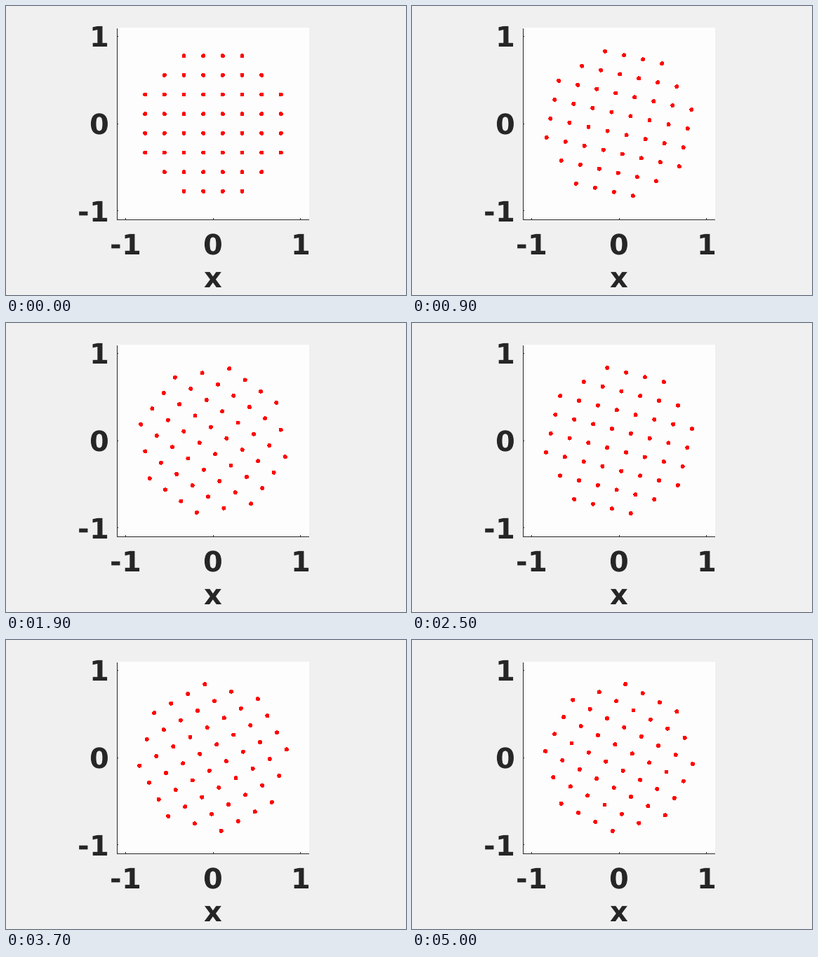
A matplotlib script that plays this animation: 570x413 px, repeating every 5.1 s.

```python
import numpy as np
import matplotlib.pyplot as plt
from matplotlib.animation import FuncAnimation
from matplotlib.patches import PathPatch, Rectangle
from matplotlib.path import Path
from matplotlib.textpath import TextPath

W, H, DPI = 570, 413, 64
FRAMES, INTERVAL = 51, 100
CX, CY, UNIT = 295.0, 168.0, 124.5   # plot centre and pixels per data unit
TURN = np.radians(-11.364)           # clockwise rotation per frame
DOT = 5.0                            # dot diameter in pixels
INK = "#262626"
FONT = {"family": "DejaVu Sans", "weight": "bold"}

fig = plt.figure(figsize=(W / DPI, H / DPI), dpi=DPI, facecolor="#f0f0f0")
ax = fig.add_axes([0, 0, 1, 1])
ax.set_xlim(0, W)
ax.set_ylim(H, 0)
ax.axis("off")


def box(x, y, w, h, color):
    ax.add_patch(Rectangle((x, y), w, h, facecolor=color, linewidth=0,
                           antialiased=False))


def glyph(x, baseline, char):
    """Draw one unhinted character with its origin at (x, baseline)."""
    outline = TextPath((0, 0), char, size=40, prop=FONT)
    verts = outline.vertices * [1, -1] + [x, baseline]
    ax.add_patch(PathPatch(Path(verts, outline.codes), facecolor=INK,
                           linewidth=0, snap=False))


# Plot area, axis lines and inward ticks
box(158, 31, 274, 274, "#fdfdfd")
box(158, 32, 1, 274, INK)
box(158, 305, 274, 1, INK)
for v in (-1, 0, 1):
    box(np.floor(CX + v * UNIT), 303, 1, 2, INK)
    box(159, np.floor(CY - v * UNIT), 1, 1, INK)

# Tick labels: y axis, x axis, then the axis title
glyph(119, 58, "1")
glyph(119, 183, "0")
glyph(102, 308, "-")
glyph(119, 308, "1")
glyph(148, 355, "-")
glyph(165, 355, "1")
glyph(281, 355, "0")
glyph(406, 355, "1")
glyph(282, 402, "x")

# Square lattice clipped to a disc
side = np.linspace(-1, 1, 10)
gx, gy = np.meshgrid(side, side)
grid = (gx + 1j * gy).ravel()
grid = grid[np.abs(grid) < 0.9]

dots = ax.scatter(grid.real, grid.imag, s=(DOT * 72 / DPI) ** 2, c="red",
                  linewidths=0, zorder=3)
# One flag per dot keeps sub-pixel placement
dots.set_antialiased([False] * len(grid))
dots.set_snap(False)


def draw(i):
    z = grid * np.exp(1j * TURN * i)
    dots.set_offsets(np.column_stack([CX + UNIT * z.real, CY - UNIT * z.imag]))
    return (dots,)


anim = FuncAnimation(fig, draw, frames=FRAMES, init_func=lambda: draw(0),
                     interval=INTERVAL, repeat=True, repeat_delay=0)
plt.show()
```
